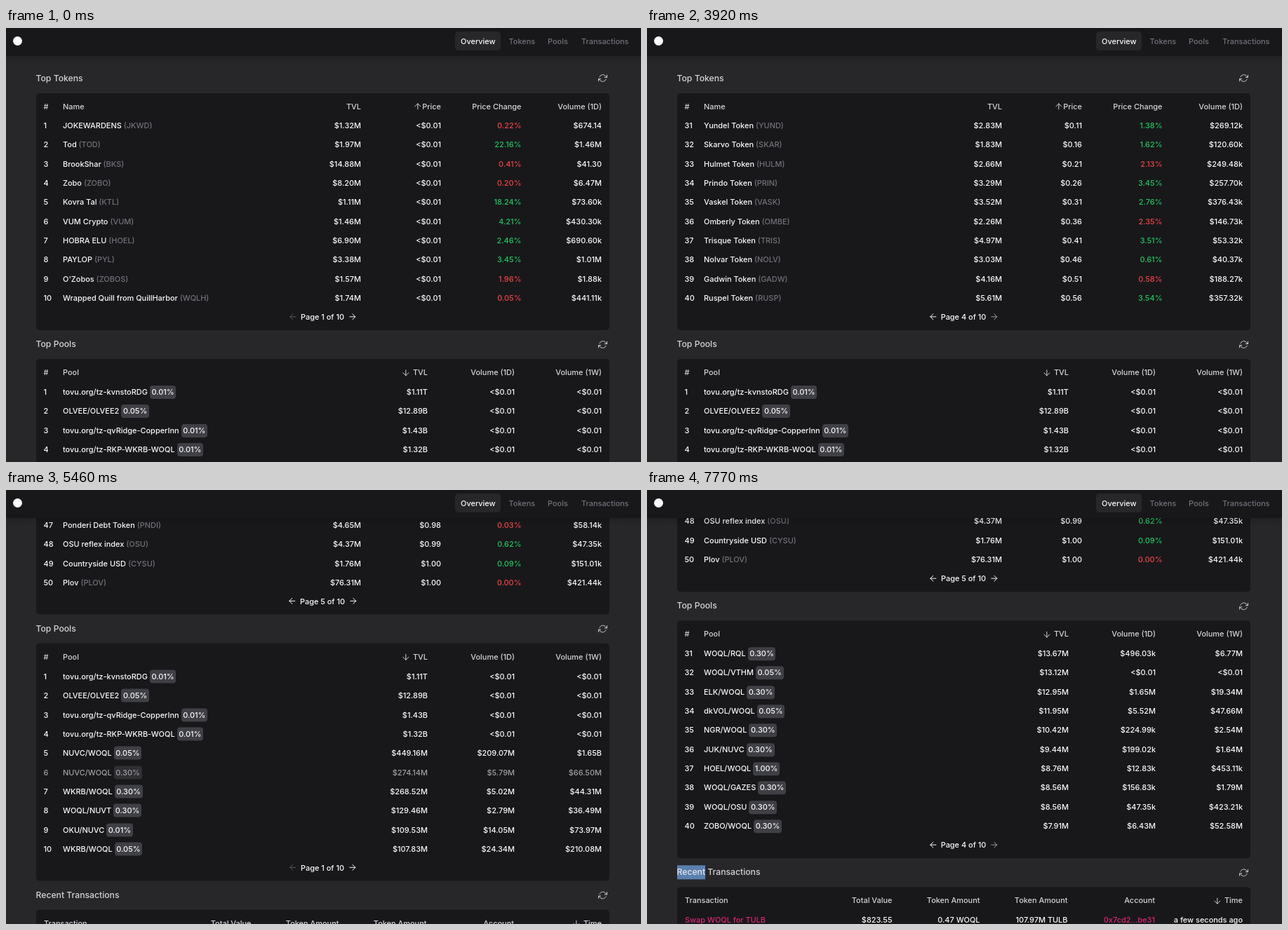
Recreate the animation shown at these times as an HTML page. Size 905 by 619 pixels, loop 8000 ms.

```html
<!DOCTYPE html>
<html lang="en">
<head>
<meta charset="utf-8">
<title>Overview</title>
<style>
html, body { margin: 0; width: 100%; height: 100%; overflow: hidden; background: #27272a; }
body { position: relative; font: 500 10.94px/20px Inter, sans-serif; color: #fafafa; white-space: pre; }
body * { box-sizing: border-box; }
header, #page, .section, .card, .row, .cell, .title, .reload, nav, .logo { position: absolute; }
header { left: 0; top: 0; width: 905px; height: 40px; background: #18181b; box-shadow: 0 2px 10px rgba(0,0,0,.25); }
.logo { left: 10px; top: 12px; width: 13px; height: 13px; border-radius: 50%; background: #fafafa; }
.pill { left: 640px; top: 5px; width: 65px; height: 27px; border-radius: 5px; background: #27272a; }
#page { left: 0; top: 0; width: 905px; }
.section { left: 0; width: 905px; }
.card { left: 42.5px; top: 92.5px; width: 817.5px; height: 338.5px; border-radius: 5px; background: #18181b; }
.title { left: 42.5px; top: 61.5px; font-size: 12.2px; color: #d4d4d8; }
.title span { display: inline-block; height: 20px; }
.title .selected { background: #5a80b0; color: #e4e4e7; }
.reload { left: 843.5px; top: 65px; width: 13px; height: 13px; color: #d4d4d8; }
.row { left: 0; width: 905px; height: 20px; }
.cell { top: 0; }
.head { color: #d4d4d8; }
.dim { color: #71717a; }
.up { color: #22c55e; }
.down { color: #ef4444; }
.link { color: #db2777; }
.fee { display: inline-block; height: 19px; line-height: 19px; padding: 0 2.7px; border-radius: 4px; background: #3f3f46; }
.pager { left: 351px; width: 200px; display: flex; justify-content: center; align-items: center; gap: 4.5px; }
svg { fill: none; stroke: currentColor; stroke-width: 1.75; stroke-linecap: round; stroke-linejoin: round; }
.arrow { width: 13.66px; height: 13.66px; vertical-align: -3.2px; }
</style>
</head>
<body>
<div id="page"></div>
<header>
  <div class="logo"></div>
  <nav class="pill"></nav>
</header>
<script>
const TICK = 70, LOOP = 8000, ROW = 27.33, SECTION = 379.9;

// name|symbol|TVL|price|change (sign gives the colour)|volume
const tokenPages = {
  1: `JOKEWARDENS|JKWD|$1.32M|<$0.01|-0.22|$674.14
Tod|TOD|$1.97M|<$0.01|+22.16|$1.46M
BrookShar|BKS|$14.88M|<$0.01|-0.41|$41.30
Zobo|ZOBO|$8.20M|<$0.01|-0.20|$6.47M
Kovra Tal|KTL|$1.11M|<$0.01|+18.24|$73.60k
VUM Crypto|VUM|$1.46M|<$0.01|+4.21|$430.30k
HOBRA ELU|HOEL|$6.90M|<$0.01|+2.46|$690.60k
PAYLOP|PYL|$3.38M|<$0.01|+3.45|$1.01M
O'Zobos|ZOBOS|$1.57M|<$0.01|-1.96|$1.88k
Wrapped Quill from QuillHarbor|WQLH|$1.74M|<$0.01|-0.05|$441.11k`,
  2: `GravelTim|GRAVEL|$2.31M|<$0.01|+0.21|$15.39k
Krilm|KRILM|$1.56M|<$0.01|+1.64|$122.85k
DULM|DULM|$2.15M|<$0.01|+0.00|<$0.01
Moth.Exchange|MTH|$2.46M|<$0.01|-0.25|$27.00k
Oruvee|OVE|$2.29M|<$0.01|+0.00|<$0.01
TKV JPY|TYEN|$1.21M|<$0.01|-0.19|$23.14k
JUK|JUK|$3.32M|<$0.01|-4.74|$1.59M
NEMRO|NEMRO|$2.51M|$0.01|+2.11|$11.51k
ProclamatorDAO|CROWDS|$1.42M|$0.01|+2.90|$206.93
Poludink|POLU|$5.70M|$0.01|-0.76|$40.54k`,
  5: `Unfading Q|UFQ|$1.48M|$0.63|-0.61|$53.92k
Norvi Token|NORVI|$13.62M|$0.65|+0.83|$1.62M
Ridge DAO Token|RDG|$4.83M|$0.65|-0.27|$629.00k
TWIG HOBRASWAP|TWIG|$2.76M|$0.71|+1.11|$145.40k
KLGD|KLGD|$2.53M|$0.75|+0.13|$121.95k
VRQO|VRQO|$1.65M|$0.88|-0.79|$94.99k
Ponderi Debt Token|PNDI|$4.65M|$0.98|-0.03|$58.14k
OSU reflex index|OSU|$4.37M|$0.99|+0.62|$47.35k
Countryside USD|CYSU|$1.76M|$1.00|+0.09|$151.01k
Plov|PLOV|$76.31M|$1.00|-0.00|$421.44k`
};

// pair|fee|TVL|day volume|week volume
const poolPages = {
  1: `tovu.org/tz-kvnstoRDG|0.01|$1.11T|<$0.01|<$0.01
OLVEE/OLVEE2|0.05|$12.89B|<$0.01|<$0.01
tovu.org/tz-qvRidge-CopperInn|0.01|$1.43B|<$0.01|<$0.01
tovu.org/tz-RKP-WKRB-WOQL|0.01|$1.32B|<$0.01|<$0.01
NUVC/WOQL|0.05|$449.16M|$209.07M|$1.65B
NUVC/WOQL|0.30|$274.14M|$5.79M|$66.50M
WKRB/WOQL|0.30|$268.52M|$5.02M|$44.31M
WOQL/NUVT|0.30|$129.46M|$2.79M|$36.49M
OKU/NUVC|0.01|$109.53M|$14.05M|$73.97M
WKRB/WOQL|0.05|$107.83M|$24.34M|$210.08M`,
  4: `WOQL/RQL|0.30|$13.67M|$496.03k|$6.77M
WOQL/VTHM|0.05|$13.12M|<$0.01|<$0.01
ELK/WOQL|0.30|$12.95M|$1.65M|$19.34M
dkVOL/WOQL|0.05|$11.95M|$5.52M|$47.66M
NGR/WOQL|0.30|$10.42M|$224.99k|$2.54M
JUK/NUVC|0.30|$9.44M|$199.02k|$1.64M
HOEL/WOQL|1.00|$8.76M|$12.83k|$453.11k
WOQL/GAZES|0.30|$8.56M|$156.83k|$1.79M
WOQL/OSU|0.30|$8.56M|$47.35k|$423.21k
ZOBO/WOQL|0.30|$7.91M|$6.43M|$52.58M`
};

let seed = 7;
const random = (low, high) => {
  seed = seed * 16807 % 2147483647;
  return (low + (high - low) * seed / 2147483647).toFixed(2);
};

// Middle pages follow the ordering of their neighbours.
const midNames = 'Brindle Tavok Welmar Opuna Quorrel Dasvi Lumbrex Fennoq Jarvel Mopsin '
  + 'Yundel Skarvo Hulmet Prindo Vaskel Omberly Trisque Nolvar Gadwin Ruspel';
midNames.split(' ').forEach((name, i) => {
  const symbol = name.slice(0, 4).toUpperCase(), n = i % 10;
  const add = (pages, page, text) => pages[page] = (pages[page] ? pages[page] + '\n' : '') + text;
  const price = i < 10 ? .01 + n * .008 : .11 + n * .05;
  add(tokenPages, i < 10 ? 3 : 4, [name + ' Token', symbol, `$${random(1, 6)}M`, `$${price.toFixed(2)}`,
    (i % 3 ? '+' : '-') + random(0, 4), `$${random(10, 400)}k`].join('|'));
  add(poolPages, i < 10 ? 2 : 3, [symbol + '/WOQL', i % 4 ? '0.30' : '0.05', `$${(95 * .906 ** i).toFixed(2)}M`,
    `$${random(1, 6)}M`, `$${random(8, 60)}M`].join('|'));
});

const icon = (cls, d) => `<svg class="${cls}" viewBox="0 0 24 24"><path d="${d}"/></svg>`;
const arrows = {
  up: icon('arrow', 'M12 19V5M5 12l7-7 7 7'),
  down: icon('arrow', 'M12 5v14M5 12l7 7 7-7'),
  left: icon('arrow', 'M19 12H5M12 5l-7 7 7 7'),
  right: icon('arrow', 'M5 12h14M12 5l7 7-7 7')
};
const reload = icon('reload', 'M23 4v6h-6M1 20v-6h6M3.5 9a9 9 0 0 1 14.9-3.4L23 10M1 14l4.6 4.4A9 9 0 0 0 20.5 15');

const escape = text => text.replace(/</g, '&lt;');
const left = (x, html, cls = '') => `<div class="cell ${cls}" style="left:${x}px">${html}</div>`;
const right = (x, html, cls = '') => `<div class="cell ${cls}" style="right:${905 - x}px">${html}</div>`;
const row = (y, html, cls = '') => `<div class="row ${cls}" style="top:${y - 10}px">${html}</div>`;
const rowY = i => 139 + ROW * i;
const rightCells = (xs, texts) => xs.map((x, i) => right(x, texts[i])).join('');

const tokenX = [506, 620, 734.5, 849], poolX = [601, 725, 849], txX = [349.5, 474.5, 599.5, 724, 849];

const tokenRow = (text, number) => {
  const [name, symbol, tvl, price, change, volume] = escape(text).split('|');
  return left(53.5, number) + left(81, `${name} <span class="dim">(${symbol})</span>`)
    + right(506, tvl) + right(620, price)
    + right(734.5, change.slice(1) + '%', change[0] === '+' ? 'up' : 'down') + right(849, volume);
};
const poolRow = (text, number) => {
  const [pair, fee, ...values] = escape(text).split('|');
  return left(53.5, number) + left(81, `${pair} <span class="fee">${fee}%</span>`) + rightCells(poolX, values);
};

const section = (index, title, head, body) => {
  const [first, ...rest] = title.split(' ');
  return `<div class="section" style="top:${SECTION * index}px"><div class="title"><span>${first}</span> ${rest.join(' ')}</div>`
    + `${reload}<div class="card"></div>${row(111.5, head, 'head')}<div class="body">${body}</div></div>`;
};

const page = document.getElementById('page');
page.innerHTML =
  section(0, 'Top Tokens', left(53.5, '#') + left(81, 'Name')
    + rightCells(tokenX, ['TVL', arrows.up + 'Price', 'Price Change', 'Volume (1D)']), '')
  + section(1, 'Top Pools', left(53.5, '#') + left(81, 'Pool')
    + rightCells(poolX, [arrows.down + ' TVL', 'Volume (1D)', 'Volume (1W)']), '')
  + section(2, 'Recent Transactions', left(54, 'Transaction')
    + rightCells(txX, ['Total Value', 'Token Amount', 'Token Amount', 'Account', arrows.down + ' Time']),
    row(139, left(54, 'Swap WOQL for TULB', 'link') + rightCells(txX,
      ['$823.55', '0.47 WOQL', '107.97M TULB', '<span class="link">0x7cd2...be31</span>', 'a few seconds ago'])));

document.querySelector('header').insertAdjacentHTML('beforeend', row(18.5,
  left(648, 'Overview') + left(716.5, 'Tokens', 'dim') + left(772, 'Pools', 'dim') + left(820, 'Transactions', 'dim')));

const bodies = page.querySelectorAll('.body');
const firstWords = page.querySelectorAll('.title span');

const showTable = (body, pages, number, makeRow) => {
  if (body.dataset.page === String(number)) return;
  body.dataset.page = number;
  body.innerHTML = pages[number].split('\n')
    .map((text, i) => row(rowY(i), makeRow(text, (number - 1) * 10 + i + 1))).join('')
    + row(412, `${arrows.left}<span>Page ${number} of 10</span>${arrows.right}`, 'pager');
  body.querySelector('.pager .arrow').style.opacity = number === 1 ? .3 : 1;
};

const tokenClicks = [2450, 3010, 3430, 4060], poolClicks = [6720, 7420, 7700];
const scrollKeys = [[4480, 0], [4550, .6], [4620, 30], [4690, 115], [4760, 200], [4830, 234], [4900, 235],
  [5250, 235], [5320, 239], [5390, 247], [5460, 253.5], [5530, 255],
  [5670, 255], [5740, 264], [5810, 279], [5880, 285.7]];

const scrollAt = t => {
  const next = scrollKeys.findIndex(key => key[0] > t);
  if (next === 0) return 0;
  if (next < 0) return scrollKeys.at(-1)[1];
  const [t0, y0] = scrollKeys[next - 1], [t1, y1] = scrollKeys[next];
  return y0 + (y1 - y0) * (t - t0) / (t1 - t0);
};
const pageAt = (clicks, t) => 1 + clicks.filter(click => click <= t).length;
const during = (t, from, to) => t >= from && t < to;
const fade = (element, on) => element.style.opacity = on ? .6 : 1;

function draw() {
  const t = Math.floor(performance.now() % LOOP / TICK) * TICK;
  const [tokens, pools] = bodies;
  showTable(tokens, tokenPages, pageAt(tokenClicks, t), tokenRow);
  showTable(pools, poolPages, pageAt(poolClicks, t), poolRow);
  fade(tokens.querySelector('.pager').lastChild, during(t, 2450, 4690));
  fade(pools.querySelector('.pager').lastChild, t >= 6370);
  fade(pools.children[5], during(t, 5040, 5740));
  firstWords[1].classList.toggle('selected', during(t, 3290, 3920));
  firstWords[2].classList.toggle('selected', t >= 7630);
  page.style.transform = `translateY(${-scrollAt(t)}px)`;
  requestAnimationFrame(draw);
}
draw();
</script>
</body>
</html>
```
